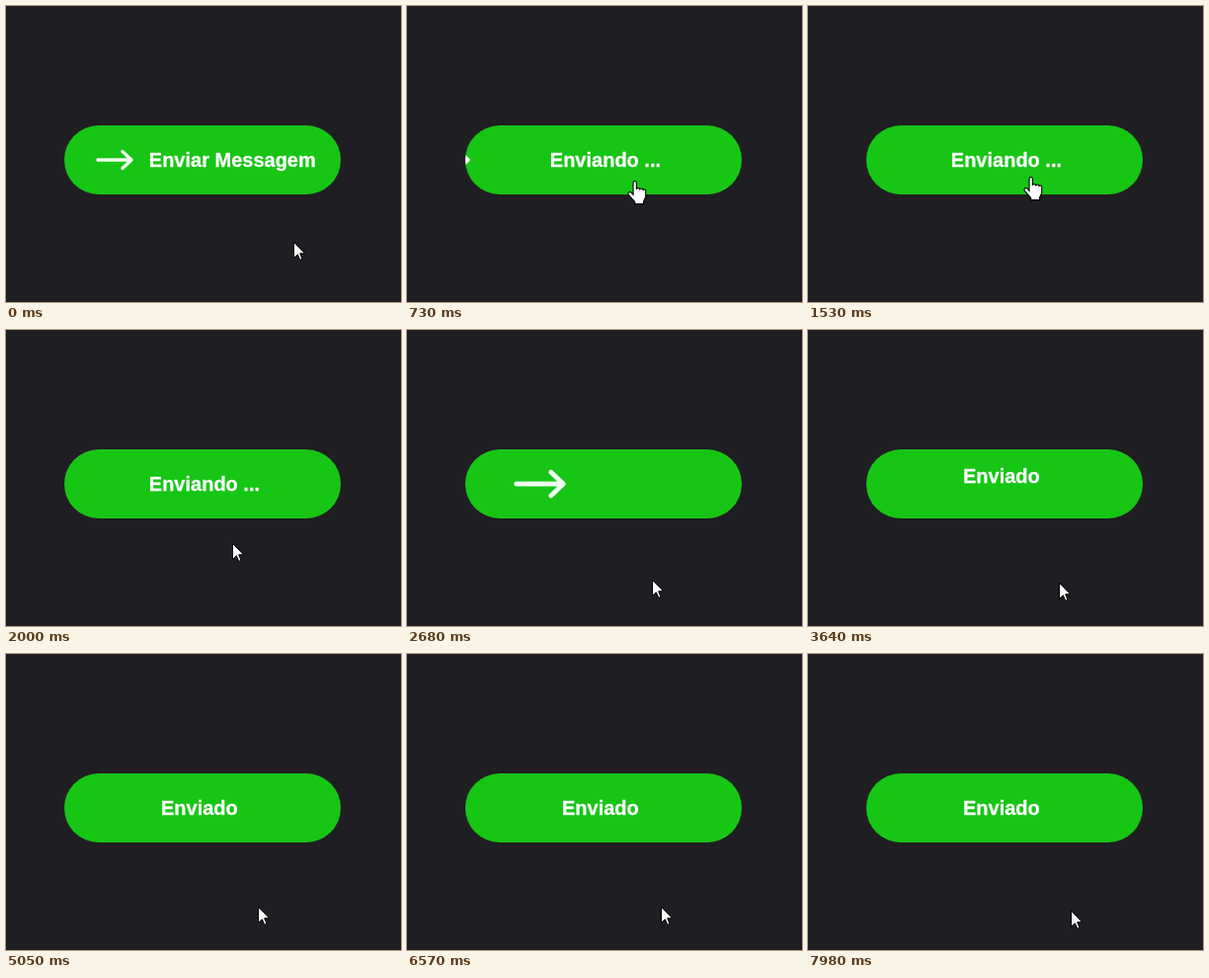
These frames come from a looping animation (400 by 300 pixels, 8 s). An HTML page:

```html
<!DOCTYPE html>
<html lang="pt">
<head>
<meta charset="utf-8">
<style>
  html, body { margin: 0; height: 100%; overflow: hidden; background: #1f1e23; }
  svg { display: block; }
  text { font: bold 20px "Liberation Sans", Arial, sans-serif; fill: #fff; stroke: #fff; stroke-width: .3; }
  #icon { fill: none; stroke: #fff; stroke-width: 3.4; stroke-linecap: round; stroke-linejoin: round; opacity: .93; }
  #pointer, #hand { fill: #fff; stroke: #000; }
</style>
</head>
<body>
<svg width="400" height="300" viewBox="0 0 400 300">
  <clipPath id="pill"><rect x="59" y="121" width="280" height="70" rx="35"/></clipPath>
  <rect x="59" y="121" width="280" height="70" rx="35" fill="#17c515"/>
  <g clip-path="url(#pill)">
    <path id="icon" d="M-17 0H17M8-8.5L17 0L8 8.5"/>
    <text id="label"></text>
  </g>
  <path id="pointer" d="M.5.5V16.5L4.3 12.8 6.8 18.4 9 17.5 6.7 11.8H11.7Z"/>
  <path id="hand" d="M5.5 13V2a1.5 1.5 0 0 1 3 0V8a1.5 1.5 0 0 1 3 .5 1.5 1.5 0 0 1 3 .5 1.3 1.3 0 0 1 2.5 .8V15l-2 4.5v2h-8v-2L1.2 13a1.6 1.6 0 0 1 2.3-2.2Z"/>
</svg>
<script>
const LOOP = 8000, SENDING = 450, LEAVING = 2360, SENT = 3450;
const [icon, label, pointer, hand] =
  ['icon', 'label', 'pointer', 'hand'].map(id => document.getElementById(id));

// Turning points of the mouse: time, x, y
const mouse = [
  [0, 291, 239], [730, 229, 177], [1270, 224, 170], [1500, 224, 170], [2000, 229, 216],
  [2680, 248, 253], [3120, 253, 256], [6800, 257, 256], [LOOP, 266, 260]
];

const lerp = (a, b, p) => a + (b - a) * p;
const progress = (t, start, length) => Math.min(1, Math.max(0, (t - start) / length));

function mouseAt(t) {
  const i = mouse.findIndex(m => m[0] > t);
  const a = mouse[i - 1], b = mouse[i], p = progress(t, a[0], b[0] - a[0]);
  return [1, 2].map(k => Math.round(lerp(a[k], b[k], p)));
}

function place(el, x, y, scale = 1) {
  el.setAttribute('transform', `translate(${x} ${y}) scale(${scale})`);
}

function write(text, x, y = 163) {
  if (label.textContent !== text) label.textContent = text;
  place(label, x, y);
}

function draw(t) {
  if (t < LEAVING) {
    place(icon, 110 - 95 * progress(t, SENDING, 340) ** 2, 156);
    write(t < SENDING ? 'Enviar Messagem' : 'Enviando ...', 144.8);
  } else {
    // The icon flies through and doubles in size
    const p = progress(t, LEAVING, 800);
    place(icon, lerp(-30, 380, p), 156, 1 + p);
    const drop = 1 - progress(t, SENT, 400);
    write(t < SENT ? '' : 'Enviado', 157, 163 - 38 * drop ** 2.4);
  }

  const [x, y] = mouseAt(t), hover = y < 191;
  pointer.style.display = hover ? 'none' : '';
  hand.style.display = hover ? '' : 'none';
  place(pointer, x, y);
  place(hand, x - 6, y, 1.1);
}

const start = performance.now();
function tick() {
  draw((performance.now() - start) % LOOP);
  requestAnimationFrame(tick);
}
tick();
</script>
</body>
</html>
```
